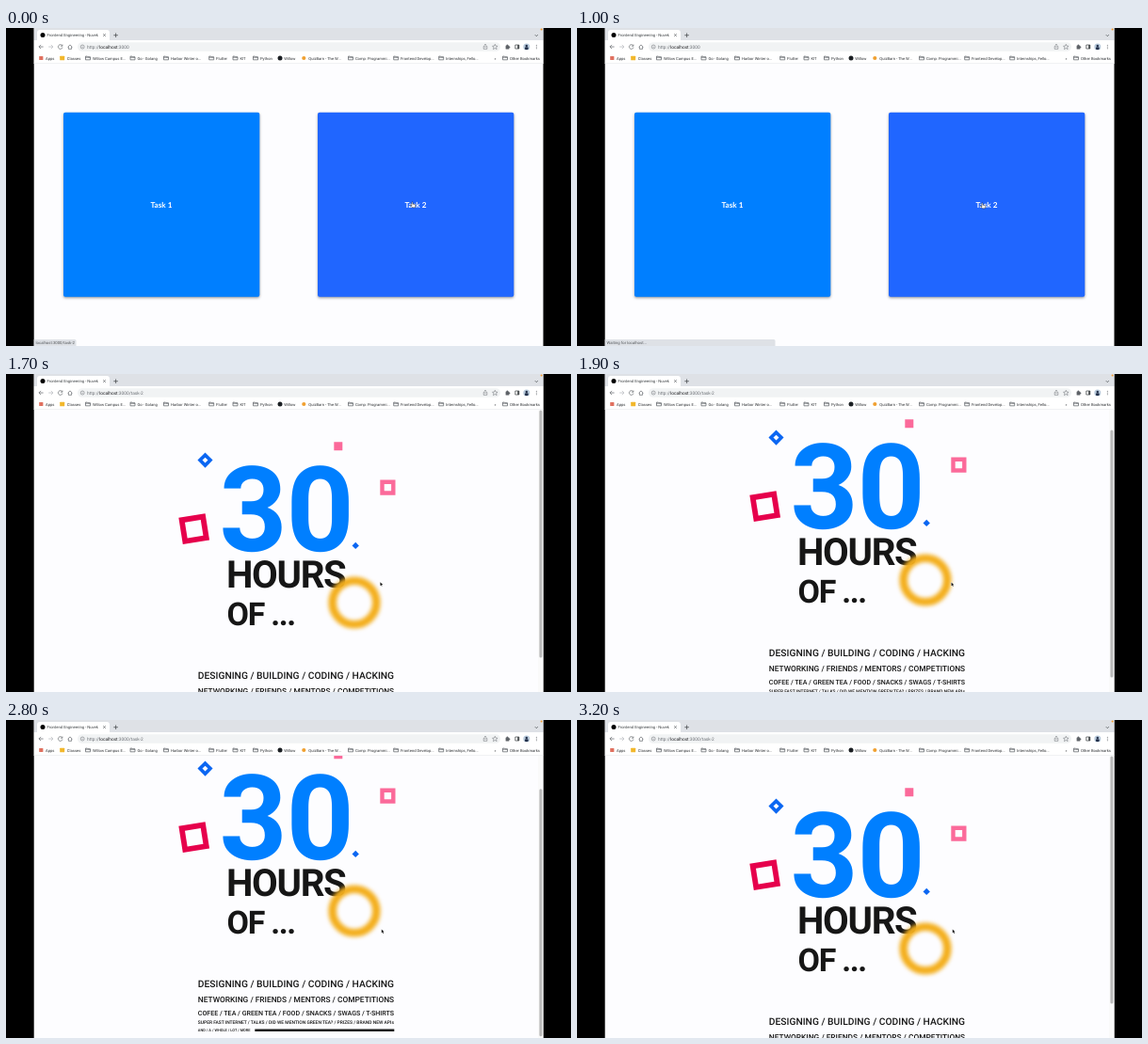
These frames come from a looping animation (600x338 px, 3300 ms). An HTML page with a canvas:

```html
<!DOCTYPE html>
<html lang="en">
<head>
<meta charset="utf-8">
<title>Task pages</title>
<style>
html, body { margin: 0; height: 100%; overflow: hidden; background: #000; }
canvas { display: block; width: 600px; height: 338px; }
</style>
</head>
<body>
<canvas id="stage" width="600" height="338"></canvas>
<script>
const c = document.getElementById('stage').getContext('2d');
const LOOP = 3300;
const UI = 'Roboto, sans-serif';
const GREY = '#5f6368';
c.textRendering = 'geometricPrecision';

// ---------- helpers ----------

function rect(x, y, w, h, color, r = 0) {
  c.fillStyle = color;
  c.beginPath();
  c.roundRect(x, y, w, h, r);
  c.fill();
}

function dot(x, y, r, color) {
  c.fillStyle = color;
  c.beginPath();
  c.arc(x, y, r, 0, 7);
  c.fill();
}

function text(str, x, y, size, color, weight = 400, family = UI, align = 'left') {
  c.font = `${weight} ${size}px ${family}`;
  c.textAlign = align;
  c.fillStyle = color;
  c.fillText(str, x, y);
  return c.measureText(str).width;
}

// Font size at which a line fills the given column
function fitSize(str, width, weight, family) {
  c.font = `${weight} 100px ${family}`;
  return 100 * width / c.measureText(str).width;
}

function line(d, color = GREY, width = 0.7) {
  c.strokeStyle = color;
  c.lineWidth = width;
  c.stroke(new Path2D(d));
}

// Linear interpolation through [time, value] points
function track(t, points) {
  let [t0, v0] = points[0];
  for (const [t1, v1] of points) {
    if (t < t1) return v0 + (v1 - v0) * Math.max(0, (t - t0) / (t1 - t0));
    [t0, v0] = [t1, v1];
  }
  return v0;
}

// Rotated square with an optional hole
function square(x, y, size, hole, deg, color) {
  c.save();
  c.translate(x, y);
  c.rotate(deg * Math.PI / 180);
  rect(-size / 2, -size / 2, size, size, color);
  if (hole) rect(-hole / 2, -hole / 2, hole, hole, '#fdfdff');
  c.restore();
}

// ---------- browser window ----------

function folder(x) {
  line(`M${x} 30.1h1.9l.6.7h2.5v3h-5zM${x} 31.2h5`, GREY, 0.75);
}

const folders = [
  [84.5, 'Willow Campus E...'], [132, 'Go - Golang'], [167.5, 'Harbor Winter o...'],
  [215.7, 'Flutter'], [241, 'KIT'], [262.5, 'Python'], [363.5, 'Comp: Programmi...'],
  [411.7, 'Frontend Develop...'], [459.7, 'Internships, Fello...'], [527.5, 'Other Bookmarks']
];

function browser(path) {
  rect(29, 0, 542, 13, '#dee1e6');
  rect(33, 2, 77, 14, '#fff', 3);
  rect(29, 13, 542, 25, '#fff');
  rect(29, 37.4, 542, 0.5, '#e3e5e8');
  dot(39, 7.6, 2.5, '#000');
  text('Frontend Engineering - Nuvek', 43.5, 9.2, 4.2, '#3c4043');
  line('M103.2 6.3l2.6 2.6M105.8 6.3l-2.6 2.6', '#3c4043', 0.6);
  line('M114.3 7.7h4.6M116.6 5.4v4.6', '#3c4043', 0.7);
  line('M561.8 7.2l1.5 1.5l1.5-1.5', '#3c4043', 0.7);
  dot(568.6, 1.6, 1, '#f39a2b');

  line('M39.6 20h-4.6M37 17.9l-2.1 2.1l2.1 2.1');
  line('M45.2 20h4.6M47.8 17.9l2.1 2.1l-2.1 2.1', '#b4b7bb');
  line('M59.5 18.6a2.3 2.3 0 1 0 .4 2M59.9 17.5v1.7h-1.7');
  line('M65.6 20.2l2.4-2.3l2.4 2.3M66.4 19.8v2.5h3.2v-2.5');

  rect(76, 15.2, 449, 9.6, '#f1f3f4', 4.8);
  line('M83.2 20a2 2 0 1 0-4 0a2 2 0 1 0 4 0M81.2 19.8v1.2M81.2 18.8v.4', GREY, 0.5);
  let x = 86;
  for (const [part, color] of [['http://', '#6b6f74'], ['localhost', '#202124'], [':3000' + path, '#6b6f74']])
    x += text(part, x, 21.7, 4.8, color);

  line('M508 19.3h-.8v3h3.6v-3h-.8M509 21v-3.6M508 18.2l1-1l1 1', GREY, 0.5);
  line('M519.3 17.3l.8 1.8l2 .2l-1.5 1.3l.5 2l-1.8-1.1l-1.8 1.1l.5-2l-1.5-1.3l2-.2z', GREY, 0.5);
  rect(530.6, 18.6, 3.8, 3.8, GREY, 0.5);
  dot(532.4, 18.3, 0.9, GREY);
  dot(534.6, 20.4, 0.8, GREY);
  line('M540.8 18h4v4h-4z', '#3c4043', 0.7);
  rect(543.2, 18, 1.6, 4, '#3c4043');
  dot(552.8, 20, 3.5, '#b9cbdc');
  dot(552.8, 18.9, 1.2, '#23304a');
  rect(550.9, 20.3, 3.8, 2.6, '#23304a', 1.2);
  for (const y of [18.2, 20, 21.8]) dot(563.3, y, 0.5, GREY);

  const label = (s, x) => text(s, x, 33.5, 4.15, '#303336');
  rect(35.2, 29.9, 4.2, 4.2, '#e0705f', 0.5);
  label('Apps', 42);
  rect(57.2, 29.8, 5, 4.4, '#f2b72b', 0.5);
  label('Classes', 64.8);
  for (const [x, s] of folders) {
    folder(x);
    label(s, x + 7.4);
  }
  dot(291, 32, 2.5, '#1b1f23');
  label('Willow', 295.3);
  dot(316.3, 32, 2.1, '#f0a030');
  label('QuizBarn - The W...', 321.3);
  label('»', 518.6);
}

function status(str, width) {
  rect(29, 331, width + 1, 8, '#dee1e6', [0, 1.5, 0, 0]);
  text(str, 31.5, 336.4, 4.25, '#55585c');
}

// ---------- pages ----------

function tasks() {
  [['Task 1', 61, '#007fff'], ['Task 2', 331, '#2066ff']].forEach(([name, x, color]) => {
    c.save();
    c.shadowColor = 'rgba(0,0,0,.38)';
    c.shadowBlur = 3;
    c.shadowOffsetY = 1.2;
    rect(x, 89.7, 208.3, 196, color, 2);
    c.restore();
    text(name, x + 104, 190.6, 8.2, '#fff', 700, 'Lato, sans-serif', 'center');
  });
}

const lines = [
  ['DESIGNING / BUILDING / CODING / HACKING', 323.7],
  ['NETWORKING / FRIENDS / MENTORS / COMPETITIONS', 339.6],
  ['COFEE / TEA / GREEN TEA / FOOD / SNACKS / SWAGS / T-SHIRTS', 353.5],
  ['SUPER FAST INTERNET / TALKS / DID WE MENTION GREEN TEA? / PRIZES / BRAND NEW APIs', 363.3]
];

function poster(scroll, fallback) {
  const family = fallback ? '"Liberation Sans", Arial, sans-serif' : UI;
  const ink = '#161616';
  // The wider fallback font spreads the decorations apart
  const px = x => fallback ? 308.4 + (x - 308) * 1.063 : x;
  const py = y => fallback ? 200 + (y - 200) * 0.982 : y;

  c.save();
  c.translate(0, -scroll);
  const left = fallback ? 229 : 234;
  c.letterSpacing = '-1.3px';
  text('30', 297.4, fallback ? 190 : 187.8, 126, '#007fff', 700, family, 'center');
  text('HOURS', left, fallback ? 226.2 : 227.1, 40.2, ink, 700, family);
  text('OF ...', left + 0.5, fallback ? 265.5 : 266.7, 34, ink, 700, family);
  c.letterSpacing = '0px';

  square(px(211.5), py(91.6), 11.4, 4.2, 45, '#0b66f2');
  square(px(352.8), py(76.8), 9, 0, 0, '#fb6a9a');
  square(px(405.4), py(120.6), 16.2, 7.4, 0, '#fb6a9a');
  square(px(199.7), py(164.7), 28.6, 17, -9, '#e6004c');
  square(px(371.2), py(182.4), 5.2, 0, 45, '#0b66f2');

  c.filter = 'blur(2px)';
  c.strokeStyle = '#f3ae1c';
  c.lineWidth = 8.6;
  c.beginPath();
  c.arc(px(370), py(243), 23.3, 0, 7);
  c.stroke();
  c.filter = 'none';

  if (fallback) {
    text(lines[0][0], 198.3, 321.6, 10.28, ink, 400, family);
    text(lines[1][0].slice(2), 209.2, 337.9, 8.36, ink, 400, family);
  } else {
    for (const [str, y] of lines)
      text(str, 203.8, y, fitSize(str, 208.5, 500, family), ink, 500, family);
    text('AND / A / WHOLE / LOT / MORE', 203.8, 371.2, 3.95, ink, 500, family);
    rect(264.3, 368.6, 148, 2.5, ink);
  }
  c.restore();

  rect(565, 38, 6, 300, '#fafafa');
  rect(566.4, 38.5 + scroll * 0.87, 3, 263, '#b9b9b9', 1.5);
}

// ---------- pointers ----------

function pointer(x, y, shape, scale = 1) {
  c.save();
  c.translate(x, y);
  c.scale(scale, scale);
  const p = new Path2D(shape);
  c.strokeStyle = '#fff';
  c.lineWidth = 0.9;
  c.stroke(p);
  c.fillStyle = '#111';
  c.fill(p);
  c.restore();
}

const ARROW = 'M0 0v4.4l1-.9l.7 1.6l.8-.3l-.7-1.6h1.4z';

function hand(x, y) {
  c.save();
  c.translate(x, y);
  const p = new Path2D('M-.6 2v-3.6q.6-.9 1.1 0v1.7l2.2.5q.7.3.6 1l-.5 2.2h-2.8l-1.9-2.2q0-.7.8-.3z');
  c.fillStyle = '#fff';
  c.fill(p);
  c.strokeStyle = '#222';
  c.lineWidth = 0.5;
  c.stroke(p);
  c.restore();
}

// ---------- timeline ----------

function draw(now) {
  const t = Math.floor(now % LOOP / 100) * 100;
  const loaded = t >= 1100;
  const scroll = track(t, [[1700, 0], [1800, 7], [1900, 24], [2000, 37], [2100, 41], [2600, 41],
    [2800, 40], [2900, 29], [3000, 11], [3100, 2], [3200, 0]]);
  const x = track(t, [[200, 431.5], [500, 430.5], [1200, 430.5], [1300, 421], [1400, 404], [1500, 397.3],
    [2100, 397.7], [2500, 398.8]]);
  const y = track(t, [[200, 187], [500, 188], [1000, 188], [1100, 186.2], [1200, 187], [1300, 199], [1400, 216],
    [1500, 221], [2100, 221.7], [2500, 222.6]]);

  c.fillStyle = '#000';
  c.fillRect(0, 0, 600, 338);
  c.save();
  c.beginPath();
  c.rect(29.7, 0, 540.8, 338);
  c.clip();
  rect(29, 0, 542, 338, '#fdfdff');
  if (loaded) poster(scroll, t < 1200);
  else tasks();
  browser(loaded ? '/task-2' : '');
  if (t < 1300)
    status(t === 1000 ? 'Waiting for localhost...' : 'localhost:3000/task-2', t === 1000 || t === 1100 ? 180.5 : 44.5);
  if (loaded) pointer(x, y, ARROW, 0.85);
  else hand(x, y);
  c.restore();
}

function frame() {
  draw(performance.now());
  requestAnimationFrame(frame);
}
frame();
</script>
</body>
</html>
```
